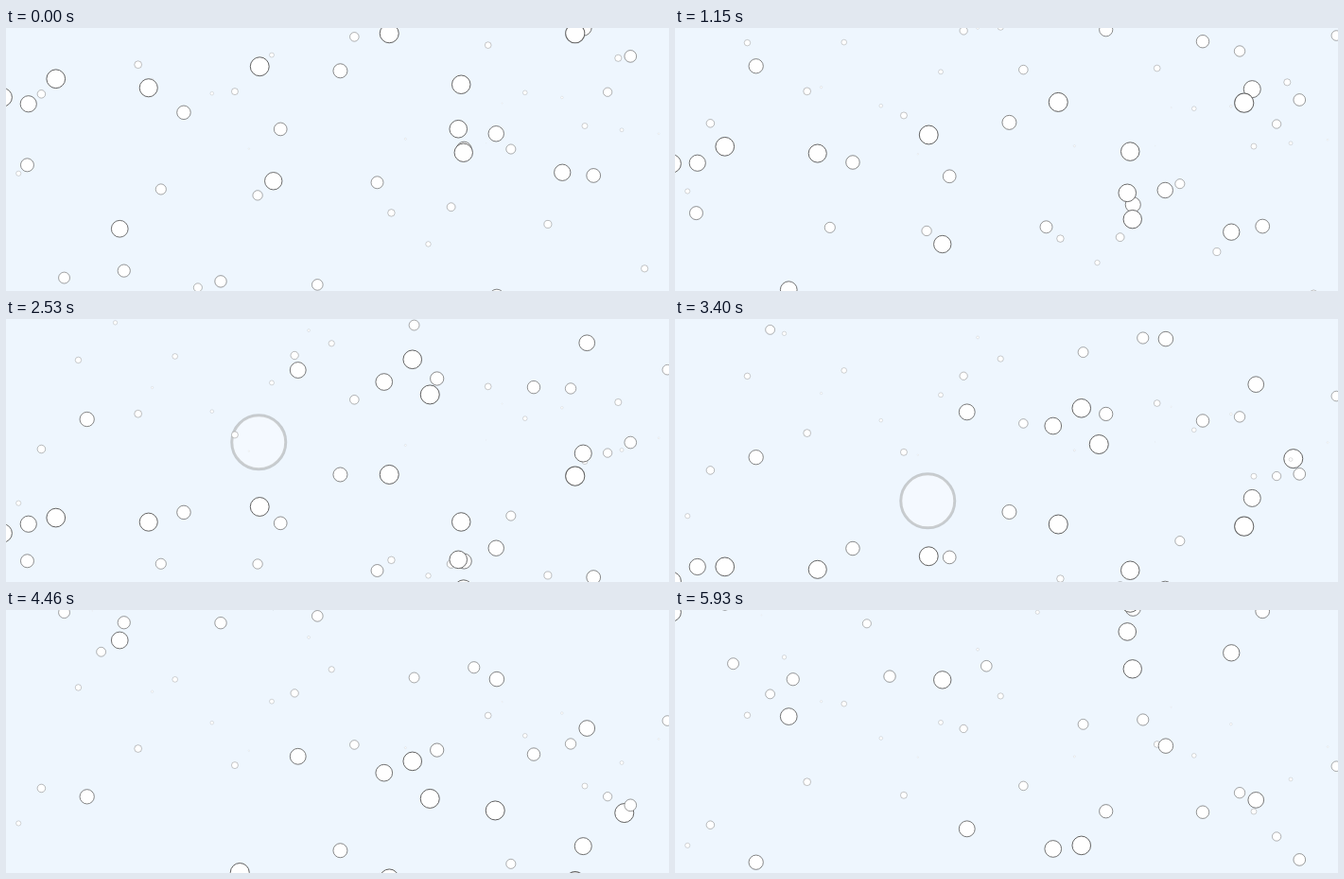
An HTML page with a canvas that plays this animation: 701 by 278 pixels, repeating every 6.01 s.

```html
<!DOCTYPE html>
<html lang="en">
<head>
<meta charset="utf-8">
<title>Snow</title>
<style>
  html, body { margin: 0; width: 100%; height: 100%; overflow: hidden; background: #eef6fe; }
  canvas { display: block; }
</style>
</head>
<body>
<canvas id="stage" width="701" height="278"></canvas>
<script>
const ctx = document.getElementById('stage').getContext('2d');
const W = 701, H = 278;
const LOOP = 6010, STEP = 77, LAST = 77;
const SPEED = 0.478;            // fall per step, per unit of radius
const WRAP = 427, FLOOR = 407;  // flakes leave below the stage and re-enter above it
const SWOLLEN = 30, SETTLED = 10;

// The most prominent flakes: x, starting y, radius
const leaders = [
  [405, 5.5, 10], [601.5, 5.5, 10.1], [610, -1, 9], [52.5, 53.5, 9.85], [150.5, 63, 9.54],
  [268, 40.5, 9.94], [481, 59.5, 9.75], [-3.5, 73, 9.65], [23.5, 80, 8.6], [478, 106.5, 9.3],
  [518, 111.5, 8.22], [484, 128, 8.05], [483.5, 131.5, 9.69], [588, 152.5, 8.66],
  [614, 319.5, 8.35], [429.5, 314, 9.8], [399.5, 353, 8.84], [308.5, 347, 8.43],
  [120, 212, 8.87], [282.5, 161.5, 9.19]
];

function seeded(seed) {
  return () => (seed = (seed * 16807) % 2147483647) / 2147483647;
}

// The rest: radii spread evenly, x by the golden ratio, y at random
function scatter(count) {
  const random = seeded(2024);
  return Array.from({ length: count }, (_, i) => [
    W * ((i * 0.618034 + 0.13) % 1),
    random() * WRAP + FLOOR - WRAP,
    0.5 + 7.4 * i / count
  ]);
}

const flakes = [...scatter(57), ...leaders].sort((a, b) => a[2] - b[2]);

// Touched flakes swell, fall faster, then settle; touches are [step, length]
const touched = [
  { left: 237, top: -96, r: 10, touches: [[29, 4], [43, 5]] },
  { left: 643.5, top: 28, r: 3.56, touches: [[39, 2]] },
  { left: 507, top: 121, r: 0.4, touches: [[47, 2]] },
  { left: 438, top: -20, r: 0.4, touches: [[19, 2]] }
];

function disc(x, y, r) {
  const big = r === SWOLLEN;
  ctx.beginPath();
  ctx.arc(x + 0.25, y + 0.25, big ? r - 1.5 : r, 0, Math.PI * 2);
  ctx.fillStyle = big ? 'rgba(255,255,255,.35)' : '#fff';
  ctx.strokeStyle = big ? 'rgba(50,45,40,.22)' : '#606060';
  ctx.lineWidth = r / 10;
  ctx.fill();
  ctx.stroke();
}

function drawFlake([x, y0, r], travel) {
  let y = y0 + SPEED * r * travel;
  if (y > FLOOR) y -= WRAP;
  disc(x, y, r);
}

function drawTouched({ left, top, r, touches }, n) {
  for (let k = 1; k <= n; k++) {
    if (touches.some(([at, len]) => k > at && k <= at + len)) r = SWOLLEN;
    else if (r === SWOLLEN) r = SETTLED;
    top += SPEED * r;
  }
  disc(left + r, top + r, r);
}

function draw(t) {
  const n = Math.min(LAST, Math.floor((t + 14) / STEP));
  const travel = n + Math.min(n, 1) * 0.2;
  ctx.fillStyle = '#eef6fe';
  ctx.fillRect(0, 0, W, H);
  touched.forEach(f => drawTouched(f, n));
  flakes.forEach(f => drawFlake(f, travel));
}

const start = performance.now();
function tick() {
  draw((performance.now() - start) % LOOP);
  requestAnimationFrame(tick);
}
tick();
</script>
</body>
</html>
```
